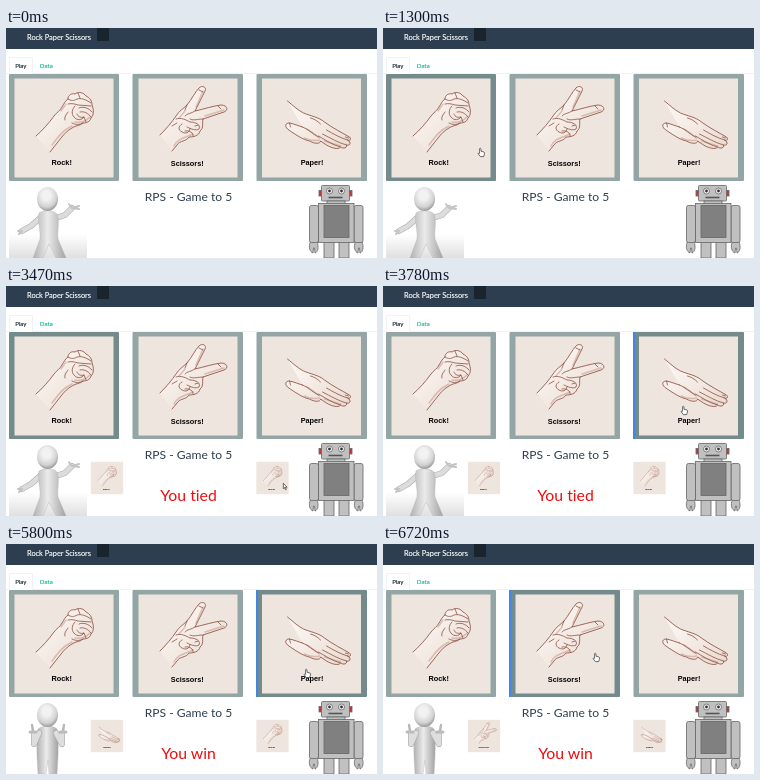
Recreate the animation shown at these times as an HTML page. Size 371 by 230 pixels, loop 8000 ms.

```html
<!DOCTYPE html>
<html lang="en">
<head>
<meta charset="utf-8">
<title>Rock Paper Scissors</title>
<style>
  html, body { margin: 0; width: 100%; height: 100%; overflow: hidden; background: #fff; }
  svg { display: block; width: 371px; height: 230px; font-family: Lato, sans-serif; font-variant-ligatures: none; }
  .label { font: bold 7.3px "Liberation Sans", Arial, sans-serif; text-anchor: middle; fill: #000; }
  .mid { text-anchor: middle; }
  .small { stroke: currentColor; fill: currentColor; stroke-width: .15; }
  .skin { fill: url(#skin); stroke: #85483a; stroke-width: .8; stroke-linejoin: round; stroke-linecap: round; }
  .line { fill: none; stroke: #85483a; stroke-width: .75; stroke-linecap: round; }
  .tone { fill: none; stroke: #b98474; stroke-width: 1.5; stroke-linecap: round; opacity: .45; }
  .man { stroke: #b4b4b4; stroke-width: .4; fill: url(#body); }
  .limb { fill: none; stroke-linecap: round; stroke-linejoin: round; }
  .bot { stroke: #666; stroke-width: .8; fill: #c0c0c0; }
</style>
</head>
<body>
<svg viewBox="0 0 371 230">
  <defs>
    <linearGradient id="skin" x1="0" y1="0" x2="1" y2="1">
      <stop offset=".2" stop-color="#faf4f0"/><stop offset="1" stop-color="#eadad0"/>
    </linearGradient>
    <radialGradient id="ball" cx=".45" cy=".35" r=".65">
      <stop offset=".3" stop-color="#f2f2f2"/><stop offset=".75" stop-color="#d2d2d2"/><stop offset="1" stop-color="#999"/>
    </radialGradient>
    <linearGradient id="body">
      <stop offset="0" stop-color="#b0b0b0"/><stop offset=".45" stop-color="#ebebeb"/><stop offset="1" stop-color="#a2a2a2"/>
    </linearGradient>
    <linearGradient id="floor" x1="0" y1="0" x2="0" y2="1">
      <stop offset="0" stop-color="#fff"/><stop offset="1" stop-color="#e0e0e0"/>
    </linearGradient>
    <rect id="sheet" x="-.5" y="-.5" width="99" height="99" fill="#efe5df"/>

    <g id="rock">
      <use href="#sheet"/>
      <path class="skin" d="M21 57C27 52 34 44 39 37C42 33 45 32 47 28C49 25 50 22 53 20C53 16 57 14 60 15C64 12 69 14 71 17C75 19 77 22 77 26C79 31 79 36 76 39C75 43 71 44 68 44C65 47 61 46 57 49C53 51 49 55 46 59L35 73"/>
      <path class="tone" d="M37 66C43 58 48 51 57 47M60 43C65 44 71 42 75 38M46 32L51 25"/>
      <path class="line" d="M53 20C56 22 59 22 62 20C66 19 70 20 76 24M53 25C56 24 60 25 63 26L76 27M60 27C57 30 56 35 59 38C62 42 67 41 69 38C66 39 63 38 62 35M64 29C68 27 74 29 77 33M65 33C69 32 73 34 76 38M69 38L71 43M53 33C51 36 49 38 50 41M63 14L65 19M57 44C61 46 64 46 68 44"/>
      <text class="label" x="46.7" y="86">Rock!</text>
    </g>

    <g id="scissors">
      <use href="#sheet"/>
      <path class="skin" d="M21 56C28 49 33 43 37 37C40 32 44 30 48 26C53 20 56 13 60 9C63 6 68 8 66 12L56 32C65 30 74 27 82 26C88 26 90 31 85 33L64 40C63 44 65 49 61 52C60 57 54 58 50 58C47 63 41 61 38 66L33 72"/>
      <path class="tone" d="M57 28L64 12M66 37L85 31M35 67C39 59 46 59 54 55M40 39L46 32"/>
      <path class="line" d="M56 32C52 35 48 34 46 37M64 40C58 40 55 42 51 40M37 40C42 38 47 41 51 43C57 43 62 46 60 50C57 52 52 50 48 48M46 52C50 51 55 54 54 57M43 45C39 47 39 51 43 53C47 55 50 54 51 50M48 26L46 31M79 27L82 30M60 11L64 13M33 47L38 44M56 47L59 46"/>
      <text class="label" x="48.2" y="87">Scissors!</text>
    </g>

    <g id="paper">
      <use href="#sheet"/>
      <path class="skin" d="M25 22C30 26 35 31 41 34C48 37 56 38 62 43C70 49 80 54 87 58C89 60 88 62 85 61C89 63 88 67 84 66C85 69 81 70 78 68C76 71 69 69 64 66L58 62C58 65 52 65 47 62C41 61 32 55 25 50C22 47 23 44 27 44C32 45 36 47 40 48"/>
      <path class="tone" d="M42 59C48 62 53 62 57 61M62 62L78 67M44 50C48 52 53 56 57 59"/>
      <path class="line" d="M40 48C46 50 50 55 56 58M85 61C78 59 71 55 64 51M84 66C76 64 68 59 60 55M78 68C70 66 63 61 56 57M48 39C52 40 55 42 58 45M27 44L28 48M86 59L83 58"/>
      <text class="label" x="49.5" y="86">Paper!</text>
    </g>
  </defs>

  <rect width="371" height="230" fill="#fff"/>
  <rect width="371" height="21" fill="#2c3e50"/>
  <rect x="91" width="12" height="13" fill="#1a242f"/>
  <text class="small" x="21" y="12" font-size="7.4" color="#fff">Rock Paper Scissors</text>
  <path d="M0 45.5H3.5V29.5H26.5V45.5H371" fill="none" stroke="#ecf0f1" stroke-width=".8"/>
  <text class="small" x="9.2" y="39.7" font-size="6.2" color="#1c2a38">Play</text>
  <text class="small" x="33.8" y="39.7" font-size="6.2" color="#18bc9c">Data</text>

  <g id="buttons"></g>
  <text class="mid" x="182.5" y="172.5" font-size="12.1" fill="#2c3e50">RPS - Game to 5</text>
  <text id="result" class="mid" x="182.5" y="215" font-size="15.8" fill="#f00c0c"></text>
  <use id="mine"/>
  <use id="theirs"/>

  <g id="open">
    <rect x="3" y="206" width="78" height="24" fill="url(#floor)"/>
    <path class="limb" stroke="#b0b0b0" stroke-width="6" d="M34 190L25 198L16 203M50 190L59 187L66 180"/>
    <path class="limb" stroke="#dcdcdc" stroke-width="4.6" d="M34 190L25 198L16 203M50 190L59 187L66 180"/>
    <path class="limb" stroke="#c4c4c4" stroke-width="2" d="M16 203L12 203M16 203L13 206M66 180L73 178M66 180L73 181M65 179L63 176"/>
    <path class="man" d="M33 185C38 182 47 182 51 186C54 194 51 203 52 211L60 230H50L43 216L37 230H27L34 211C35 203 31 192 33 185Z"/>
  </g>
  <g id="thumbs">
    <path class="man" d="M32 185C37 181 47 181 51 185C53 194 52 203 52 212L51 230H43L42 216L40 230H32L31 212C31 203 30 194 32 185Z"/>
    <path class="limb" stroke="#aaa" stroke-width="6" d="M33 189L28 200L28 190M50 189L56 200L56 190"/>
    <path class="limb" stroke="#dedede" stroke-width="4.8" d="M33 189L28 200L28 190M50 189L56 200L56 190"/>
    <path class="limb" stroke="#b8b8b8" stroke-width="2.4" d="M27 187L26 181M57 187L58 181"/>
    <path class="limb" stroke="#bbb" stroke-width="3" d="M24 188H30M54 188H60"/>
  </g>
  <ellipse cx="41.5" cy="171" rx="10.5" ry="12" fill="url(#ball)"/>

  <g class="bot">
    <rect x="313" y="162.5" width="4" height="5.5" fill="#c8323c"/>
    <rect x="342" y="162.5" width="4" height="5.5" fill="#c8323c"/>
    <rect x="315.5" y="157.5" width="28" height="15.5" rx="1"/>
    <rect x="321" y="173" width="18" height="3.5"/>
    <path d="M304.5 213.5C302 219 304 224 307 225L307.5 220H308.5L309 225C312 224 313 219 311 213.5ZM349.5 213.5C347 219 349 224 352 225L352.5 220H353.5L354 225C357 224 358 219 356 213.5Z"/>
    <rect x="303.5" y="177.5" width="9" height="37" rx="2"/>
    <rect x="348" y="177.5" width="9" height="37" rx="2"/>
    <path d="M318 213H328V230H318ZM333 213H343V230H333Z"/>
    <rect x="312.5" y="175.5" width="35.5" height="39"/>
    <rect x="318" y="177.5" width="25" height="32" fill="#808080"/>
    <circle cx="323.5" cy="163" r="3" fill="#f7f7f7"/>
    <circle cx="335.5" cy="163" r="3" fill="#f7f7f7"/>
    <path d="M322.5 169.5H336.5" stroke="#555" stroke-width="1.6"/>
    <g fill="#333" stroke="none"><circle cx="323.5" cy="163" r="1.4"/><circle cx="335.5" cy="163" r="1.4"/></g>
  </g>

  <g id="cursor" stroke="#222" stroke-width=".65" stroke-linejoin="round">
    <path id="pointer" fill="#fff" d="M1.6 .6Q2.5 -.2 3 .8V3.2L6 4Q6.8 4.5 6.4 6.2L5.6 8.6H2.4L.2 5.7Q0 4.6 1.6 5.3Z"/>
    <path id="arrow" fill="#fff" d="M.3 .3V5.6L1.5 4.6L2.4 6.7L3.3 6.3L2.4 4.2H4.1Z"/>
  </g>
</svg>
<script>
const LOOP = 8000;
const SVG = "http://www.w3.org/2000/svg";
const $ = id => document.getElementById(id);

const cards = [
  { name: "rock", x: 3, w: 110, ix: 9 },
  { name: "scissors", x: 126.5, w: 110.5, ix: 133 },
  { name: "paper", x: 250.5, w: 110.5, ix: 256.5 }
];

// start, end, poses, from x, from y, to x, to y
const moves = [
  [230, 830, 9, 293, 204, 94, 119],
  [980, 1150, 3, 94, 119, 95, 120],
  [2620, 3240, 9, 105, 120, 276, 197],
  [3470, 3630, 3, 277, 197, 298, 120],
  [5100, 5190, 2, 300, 122, 301, 125],
  [5800, 6260, 7, 298, 125, 210, 109]
];

// time, focused card
const clicks = [[0, ""], [980, "rock"], [3780, "paper"], [6420, "scissors"]];

// time, message, player's choice, opponent's choice
const rounds = [
  [0, "", "", ""],
  [1620, "You tied", "rock", "rock"],
  [4160, "You win", "paper", "rock"],
  [6720, "You win", "scissors", "paper"]
];

const latest = (table, t) => table.filter(row => row[0] <= t).pop();

function add(tag, attrs) {
  const el = document.createElementNS(SVG, tag);
  for (const key in attrs) el.setAttribute(key, attrs[key]);
  return $("buttons").appendChild(el);
}

for (const c of cards) {
  c.frame = add("rect", { x: c.x, y: 46, width: c.w, height: 107, rx: 1 });
  c.ring = add("rect", { x: c.x - .5, y: 46, width: 2, height: 107, fill: "#4285e8" });
  add("use", { href: "#" + c.name, x: c.ix, y: 51 });
}

function cursorAt(t) {
  const move = latest(moves, t);
  if (!move) return null;
  const [start, end, poses, x0, y0, x1, y1] = move;
  const step = Math.min(poses - 1, Math.floor((t - start) / (end - start) * (poses - 1) + 1e-6));
  const p = step / (poses - 1);
  const ease = p * p * (3 - 2 * p);
  return { x: x0 + (x1 - x0) * ease, y: y0 + (y1 - y0) * ease };
}

const show = (id, on) => $(id).setAttribute("visibility", on ? "visible" : "hidden");

function choice(id, name, x) {
  show(id, name);
  if (name) $(id).setAttribute("href", "#" + name);
  $(id).setAttribute("transform", `translate(${x} 176) scale(${32 / 98})`);
}

function draw(t) {
  const pos = cursorAt(t);
  const focus = latest(clicks, t)[1];
  let over = false;
  for (const c of cards) {
    const hover = pos && pos.x + 2 >= c.x && pos.x + 2 <= c.x + c.w && pos.y >= 46 && pos.y < 153;
    const focused = focus === c.name;
    over = over || hover;
    c.frame.setAttribute("fill", hover || focused ? "#748b8c" : "#93a6a5");
    c.ring.setAttribute("visibility", focused && c.name !== "rock" ? "visible" : "hidden");
  }
  show("pointer", pos && over);
  show("arrow", pos && !over);
  if (pos) $("cursor").setAttribute("transform", `translate(${pos.x} ${pos.y})`);

  const [, message, mine, theirs] = latest(rounds, t);
  $("result").textContent = message;
  choice("mine", mine, 85);
  choice("theirs", theirs, 250.5);
  const won = message === "You win";
  show("open", !won);
  show("thumbs", won);
}

const begin = performance.now();
function tick() {
  draw((performance.now() - begin) % LOOP);
  requestAnimationFrame(tick);
}
tick();
</script>
</body>
</html>
```
